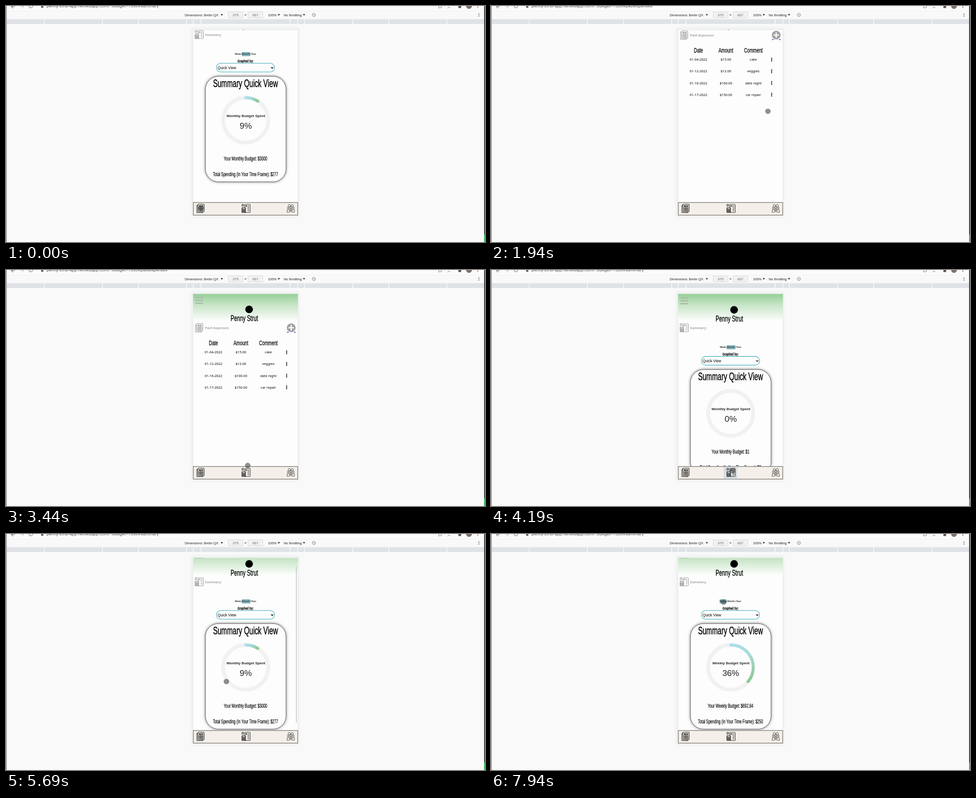
An HTML page with a canvas for the animation above (8 s loop, 1064 by 527 pixels).

```html
<!DOCTYPE html>
<html lang="en">
<head>
<meta charset="utf-8">
<title>Budget app walkthrough</title>
<style>
html, body { margin: 0; width: 100%; height: 100%; overflow: hidden; background: #f9f9f9; }
canvas { display: block; }
</style>
</head>
<body>
<canvas id="stage" width="1064" height="527"></canvas>
<script>
const ctx = document.getElementById('stage').getContext('2d');
const LOOP = 8000;
const BEAT = 150;
const MID = 532;
const SANS = '"Liberation Sans", Arial, sans-serif';
const NOTO = '"Noto Sans", sans-serif';
const CONDENSED = 0.63;
const APP = 'Penny Strut';

const within = (t, a, b) => t >= a && t < b;
const mix = (a, b, p) => a + (b - a) * p;
const progress = (t, start, end) => Math.min(1, Math.max(0, (t - start) / Math.max(1, end - start)));
const smooth = p => p * p * (3 - 2 * p);
const easeOut = p => 1 - (1 - p) ** 2;

// Sideways travel runs ahead of vertical travel, so each move bows.
function pointer(t) {
  let x = 433, y = 451;
  const glide = (start, end, toX, toY) => {
    const p = smooth(progress(t, start, end));
    x = mix(x, toX, 1 - (1 - p) ** 1.8);
    y = mix(y, toY, p);
  };
  glide(600, 1340, 621, 231);
  glide(1860, 2540, 534, 338);
  glide(2840, 3590, 537, 448);
  glide(4400, 5000, 489.5, 333.5);
  glide(5390, 5690, 489.5, 329.5);
  glide(5840, 6140, 540, 240);
  glide(6140, 6740, 516.5, 152);
  return [x, y];
}

function scrollTop(t) {
  if (t < 300) return 65.2;
  if (t < 4040) return 64 * (1 - smooth(progress(t, 1990, 2540)));
  return 22.2 * smooth(progress(t, 5390, 5690));
}

function text(str, x, y, font, color = '#111', align = 'left') {
  ctx.font = font;
  ctx.fillStyle = color;
  ctx.textAlign = align;
  ctx.fillText(str, x, y);
}

function narrow(str, x, y, size, weight = '') {
  ctx.save();
  ctx.translate(x, y);
  ctx.scale(CONDENSED, 1);
  text(str, 0, 0, `${weight} ${size}px ${SANS}`, '#000', 'center');
  ctx.lineWidth = size * 0.02;
  ctx.strokeStyle = '#000';
  ctx.strokeText(str, 0, 0);
  ctx.restore();
}

function rect(x, y, w, h, color) {
  ctx.fillStyle = color;
  ctx.fillRect(x, y, w, h);
}

function paint(fill, stroke, width) {
  if (fill) { ctx.fillStyle = fill; ctx.fill(); }
  if (stroke) { ctx.strokeStyle = stroke; ctx.lineWidth = width; ctx.stroke(); }
}

function box(x, y, w, h, r, fill, stroke, width = 1) {
  ctx.beginPath();
  ctx.roundRect(x, y, w, h, r);
  paint(fill, stroke, width);
}

function disc(x, y, r, fill, stroke, width = 1) {
  ctx.beginPath();
  ctx.arc(x, y, r, 0, Math.PI * 2);
  paint(fill, stroke, width);
}

function line(color, width, ...pts) {
  ctx.beginPath();
  for (let i = 0; i < pts.length; i += 2) ctx.lineTo(pts[i], pts[i + 1]);
  paint(null, color, width);
}

function dots(x, y, r, color) {
  for (let i = -1; i <= 1; i++) disc(x, y + i * 3, r, color);
}

function downArrow(x, y) {
  ctx.beginPath();
  ctx.moveTo(x - 2.3, y - 2);
  ctx.lineTo(x + 2.3, y - 2);
  ctx.lineTo(x, y + 2);
  paint('#333');
}

function ledgerIcon(x, y, c) {
  line(c, 1.1, x - 5, y - 7, x - 8, y - 7, x - 8, y + 9.5, x + 5, y + 9.5, x + 5, y + 7);
  box(x - 5.5, y - 9.5, 13.5, 17, 1.5, null, c, 1.2);
  rect(x - 3, y - 7, 8.5, 3.5, c);
  rect(x - 0.5, y - 6, 4, 1.3, '#f4f4f2');
  for (let i = 0; i <= 3; i++) {
    line(c, 0.9, x - 3 + i * 2.8, y - 2, x - 3 + i * 2.8, y + 5.5);
    line(c, 0.9, x - 3, y - 2 + i * 2.5, x + 5.5, y - 2 + i * 2.5);
  }
}

function summaryIcon(x, y, c) {
  disc(x - 7, y - 7, 2.5, null, c);
  rect(x - 7.4, y - 8.5, 0.9, 3, c);
  box(x - 2.5, y - 9, 12, 18, 1, null, c);
  rect(x - 1, y - 6.5, 3.5, 2.3, c);
  for (let i = 0; i < 5; i++) rect(x + 3.5, y - 6 + i * 2.7, 4, 0.9, c);
  rect(x - 9.5, y - 2, 9, 11.5, c);
  rect(x - 8, y - 0.6, 6, 2, '#f4f4f2');
  for (let i = 0; i < 9; i++) {
    rect(x - 8 + i % 3 * 2.2, y + 2.6 + Math.floor(i / 3) * 2.1, 1.3, 1.1, '#f4f4f2');
  }
}

function peopleIcon(x, y, c) {
  for (const side of [-1, 1]) {
    disc(x + side * 3.3, y - 6, 2.6, null, c, 0.9);
    disc(x + side * 5.8, y - 1, 1.9, null, c, 0.9);
    line(c, 0.9, x + side * 3, y + 8.5, x + side * 8, y + 8.5, x + side * 8, y + 3, x + side * 4.5, y + 2);
  }
  disc(x, y - 1.8, 2, null, c, 0.9);
  disc(x, y + 4, 3.6, null, c);
  disc(x, y + 4, 1.4, null, c);
}

function addressBar(hash) {
  rect(0, 0, 1064, 11, '#fbfbfb');
  rect(0, 11, 1064, 1, '#f0f0f0');
  line('#666', 1.1, 20, 1, 12, 1, 16, 5);
  line('#c4c4c4', 1.1, 31, 1, 39, 1, 35, 5);
  disc(55, 0, 4, null, '#666', 1.1);
  rect(78, 0, 5, 4, '#666');
  const host = APP.toLowerCase().replace(' ', '-');
  text(`${host}-app.herokuapp.com/?budget=1500#${hash}`, 90, 3.3, '9.7px Roboto, sans-serif', '#555');
  box(961, -3, 6, 7, 0, null, '#777');
  line('#777', 1, 981, 4.5, 984, 2.5, 987, 4.5);
  rect(1005, 0, 6, 4.5, '#555');
  disc(1028.5, 0, 6.5, '#81736b');
  dots(1048, 0, 1, '#555');
}

function deviceBar() {
  const label = `7.4px ${SANS}`;
  text('Dimensions: Brelin QX', 397, 22.5, label, '#222');
  text('100%', 582, 22.5, label, '#222');
  text('No throttling', 617, 22.5, label, '#222');
  [479.5, 606, 662].forEach(x => downArrow(x, 20));
  ['375', '667'].forEach((value, i) => {
    const x = 493.5 + i * 44;
    box(x, 13.5, 33, 13, 1, '#f2f2f2', '#d5d6d8');
    text(value, x + 16.5, 23, `8px ${SANS}`, '#666', 'center');
  });
  text('×', MID, 23, `9px ${SANS}`, '#444', 'center');
  disc(684, 20, 3.6, null, '#777', 0.9);
  line('#777', 0.9, 681, 17, 687, 23);
  dots(1050.5, 20, 0.9, '#555');

  rect(2, 29.5, 1060, 10.5, '#dfe2e6');
  for (const reach of [99, 116, 131, 238, 318, 447]) {
    for (const side of [-1, 1]) rect(MID + side * reach - 0.5, 29.5, 1.3, 10.5, '#fff');
  }
}

function browser(hash) {
  rect(0, 0, 1064, 527, '#f9f9f9');
  addressBar(hash);
  deviceBar();
  rect(0, 0, 1.5, 527, '#8b8b8b');
  rect(1062, 0, 2, 527, '#3a3d3d');
  rect(1062, 510, 2, 17, '#2fae50');
}

function appHeader(shift) {
  const fade = ctx.createLinearGradient(0, 53, 0, 113);
  fade.addColorStop(0, '#96cf96');
  fade.addColorStop(0.4, '#c5e4c5');
  fade.addColorStop(1, '#fbfdfb');
  rect(415, 53, 234, 60, fade);
  for (let i = 0; i < 3; i++) rect(420.5, 60 + shift + i * 6.6, 17.5, 2.3, '#a8b5a8');
  disc(540, 88 + shift, 8.5, '#000');
  narrow(APP, 529.5, 113.8 + shift, 18.5);
}

function pageTitle(title, icon) {
  icon(429, 129, '#969696');
  text(title, 442, 131.7, `bold 7.5px ${NOTO}`, '#a5a5a5');
}

function pastExpenses() {
  appHeader(0);
  pageTitle('Past Expenses', ledgerIcon);
  disc(633.5, 129, 9.8, '#a3a3a3');
  rect(627.5, 127.7, 12, 2.6, '#fff');
  rect(632.2, 123, 2.6, 12, '#fff');
  for (const x of [624, 639.5]) rect(x, 138.3, 4, 1.4, '#4423b5');

  const column = i => 460.8 + i * 61;
  ['Date', 'Amount', 'Comment'].forEach((head, i) => narrow(head, column(i), 167.5, 15));
  const rows = [
    '01-04-2022 / $15.00 / cake',
    '01-12-2022 / $12.00 / veggies',
    '01-16-2022 / $100.00 / date night',
    '01-17-2022 / $150.00 / car repair'
  ];
  rows.forEach((row, i) => {
    const y = 183.7 + i * 26.1;
    row.split(' / ').forEach((cell, j) => {
      text(cell, column(j), y + 2.6, `500 7.5px ${NOTO}`, '#000', 'center');
    });
    dots(623.4, y, 1.2, '#111');
  });
}

function ring(percent) {
  const cx = 532.5, cy = 320, r = 50, top = -Math.PI / 2;
  disc(cx, cy, r, null, '#f6f6f6', 9.5);
  disc(cx, cy, r, null, '#f1f1f2', 7);
  if (percent <= 0) return;
  const end = top + percent / 100 * Math.PI * 2;
  const tint = ctx.createLinearGradient(cx, cy - r, cx + r * Math.cos(end), cy + r * Math.sin(end));
  tint.addColorStop(0, '#abdfea');
  tint.addColorStop(0.4, '#a5dbdc');
  tint.addColorStop(1, '#8dc991');
  ctx.beginPath();
  ctx.arc(cx, cy, r, top, end);
  ctx.lineCap = 'round';
  paint(null, tint, 6.5);
  ctx.lineCap = 'butt';
}

function periodPicker(weekly) {
  box(weekly ? 508.5 : 524.5, 168.7, weekly ? 14 : 17.5, 7.8, 0, '#89bec6', '#5c98a1', 0.9);
  const small = `600 5px ${NOTO}`;
  text('Week', 515, 174.2, small, '#333', 'center');
  text('Month', 533.2, 174.2, small, '#333', 'center');
  text('Year', 550.3, 174.2, small, '#333', 'center');
  for (const x of [523.3, 543.7]) text('|', x, 174.2, small, '#333', 'center');
}

function summary({ period, percent, arc, budget, spent }) {
  appHeader(1);
  pageTitle('Summary', summaryIcon);
  periodPicker(period === 'Weekly');

  narrow('Graphed by:', MID, 191, 9.6, 'bold');
  box(467.3, 193, 129.4, 19.5, 9.7, '#fdfdfd', '#4fb3be', 1.3);
  text('Quick View', 470, 205.8, `8.3px ${SANS}`, '#000');
  line('#111', 1.5, 588.8, 201.8, 591.3, 204.3, 593.8, 201.8);

  ctx.save();
  ctx.shadowColor = 'rgba(0,0,0,.6)';
  ctx.shadowBlur = 6;
  box(443, 222.3, 179, 235.5, 29, '#fdfdfd');
  ctx.restore();
  box(443, 222.3, 179, 235.5, 29, null, '#5d5a5d');
  narrow('Summary Quick View', MID, 246, 24);

  ring(arc);
  text(`${period} Budget Spent`, 533, 312.8, `bold 8.1px ${SANS}`, '#222', 'center');
  text(`${percent}%`, 532.5, 338.8, `18.6px ${SANS}`, '#222', 'center');
  narrow(`Your ${period} Budget: $${budget}`, MID, 410, 12.2);
  narrow(`Total Spending (In Your Time Frame): $${spent}`, MID, 445, 12);
}

function summaryState(t) {
  if (t >= 7490) {
    const arc = mix(9, 36, easeOut(progress(t, 7440, 7940)));
    return { period: 'Weekly', percent: 36, arc, budget: '692.84', spent: 250 };
  }
  if (within(t, 4040, 4340)) return { period: 'Monthly', percent: 0, arc: 0, budget: 1, spent: 0 };
  const arc = t < 4040 ? 9 : 9 * easeOut(progress(t, 4240, 4840));
  return { period: 'Monthly', percent: 9, arc, budget: 3000, spent: 277 };
}

function navBar(t) {
  box(416, 438.7, 232, 28.3, 0, '#f4f0e9', '#86827b', 1.5);
  if (within(t, 300, 450)) rect(417, 439.5, 30, 26.8, '#d6dcde');
  if (within(t, 4040, 4340)) rect(517, 439.5, 30, 26.8, '#d6dcde');
  ledgerIcon(432, 452, '#161616');
  summaryIcon(533, 452, '#222');
  peopleIcon(632.5, 452, '#333');
}

function draw(now) {
  const time = now % LOOP;
  const t = time < 740 ? time : Math.floor((time - 140) / BEAT) * BEAT + 140;
  const past = within(t, 300, 4040);
  const scroll = scrollTop(t);

  browser(past ? 'pastexpenses' : 'summary');
  box(408, 45, 246, 430, 9, '#f5f6f6');
  box(411, 48, 240, 424, 6, '#f1f3f3');
  box(415.5, 53, 233, 414, 0, '#fcfdfc', '#e4e6e5');

  ctx.save();
  ctx.beginPath();
  ctx.rect(415.5, 53.5, 233, 385);
  ctx.clip();
  ctx.translate(0, -scroll);
  if (past) pastExpenses();
  else summary(summaryState(t));
  ctx.restore();

  if (within(t, 2090, 2990) || within(t, 5090, 6140)) {
    box(644, 55 + scroll * 0.78, 1.8, 349.5, 1, '#c5c8c6');
  }
  navBar(t);
  disc(...pointer(t), 5.7, 'rgba(70,70,70,.6)', 'rgba(60,60,60,.35)', 0.9);
}

function tick() {
  draw(performance.now());
  requestAnimationFrame(tick);
}
tick();
</script>
</body>
</html>
```
